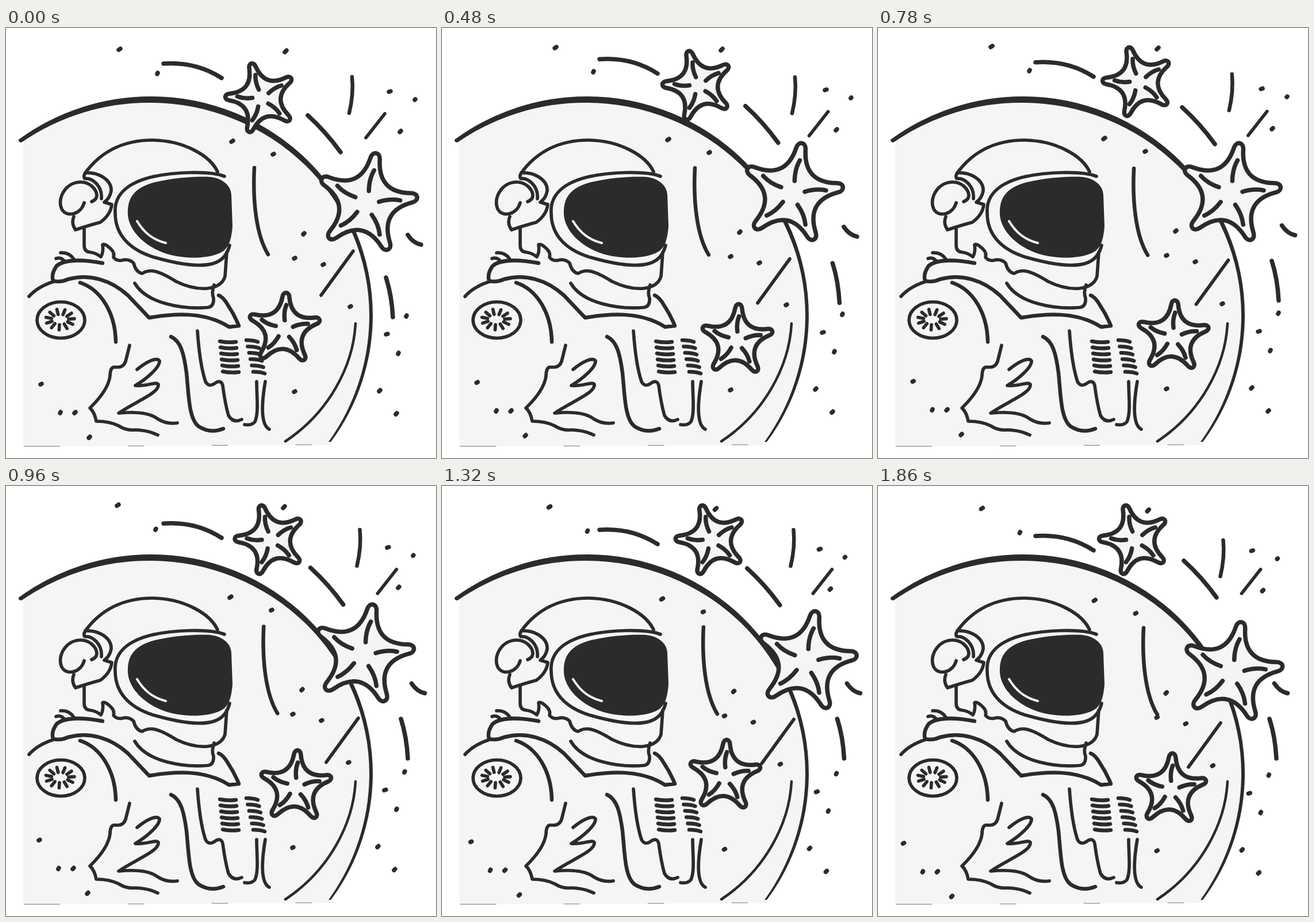
Animation of 748 by 748 pixels, one loop 1.92 s. Source, as an HTML page:

```html
<!DOCTYPE html>
<html lang="en">
<head>
<meta charset="utf-8">
<title>Astronaut and stars</title>
<style>
  html, body { margin: 0; width: 100%; height: 100%; overflow: hidden; background: #fff; }
  svg { display: block; width: 100vw; height: 100vh; }
  .ink { fill: none; stroke: #2b2b2b; stroke-width: 5.7; stroke-linecap: round; stroke-linejoin: round; }
  .solid { fill: #2b2b2b; stroke: none; }
  .pale { fill: #f5f5f4; }
  .bold { stroke-width: 6.5; }
  .heavy { stroke-width: 7.5; }
</style>
</head>
<body>
<svg viewBox="0 0 748 748">
  <!-- moon -->
  <path class="pale" d="M30 728V194A390 390 0 0 1 252 122A383 378 0 0 1 635 500A372 372 0 0 1 563 720L566 725Z"/>
  <path class="solid" d="M22 194A390 390 0 0 1 252 119A386 381 0 0 1 638 500A368 368 0 0 1 565 720L561 720A376 376 0 0 0 632 500A382 370 0 0 0 250 130A390 390 0 0 0 27 199Q21 199 22 194Z"/>
  <path class="ink" style="stroke-width:1;stroke:#777" d="M32 727.5H94M212 727H240M358 726H386M504 725H532"/>
  <path class="ink" style="stroke-width:4.5" d="M608 514C604 590 560 670 486 719"/>

  <!-- helmet -->
  <g class="ink">
    <path d="M138 252C165 215 205 195 255 195C310 196 355 222 368 250"/>
    <path d="M380 258C355 248 290 250 250 260C205 272 188 295 190 322C190 360 215 385 255 398C300 411 340 418 365 408C380 402 386 390 389 378"/>
    <path class="solid" d="M212 325C210 290 230 276 260 268C295 260 330 258 355 259C378 262 391 274 392 290L394 345C392 368 388 384 373 391C350 402 310 402 280 393C240 380 214 352 212 325Z"/>
    <path style="stroke:#f5f5f4;stroke-width:4" d="M228 336C240 356 255 368 278 374"/>
    <path d="M136 304C130 325 105 330 97 315C88 295 105 268 130 268C145 268 158 280 158 292Q157 299 149 302"/>
    <path d="M138 252Q134 258 137 262C150 260 168 275 166 297"/>
    <path d="M138 252C160 250 184 264 183 283Q181 296 171 303L184 307Q182 325 164 338Q145 343 121 351Q113 340 118 328"/>
    <path d="M136 347V378Q136 389 146 390Q156 391 165 398Q170 390 168 377Q172 374 183 385Q189 391 187 399Q193 406 202 404Q214 401 222 409Q226 425 237 427Q246 421 258 423Q272 426 296 441Q325 455 350 453Q376 450 381 432L384 390"/>
    <path d="M362 447Q357 460 361 470Q362 484 352 486C310 490 245 480 224 444"/>
  </g>

  <!-- suit -->
  <g class="ink">
    <path class="bold" d="M168 409C130 402 100 403 88 414Q78 428 82 440Q95 443 108 437C145 427 182 438 212 465Q232 486 249 504C290 497 345 492 388 520L405 518Q398 500 386 482Q378 468 370 465"/>
    <path d="M40 467Q55 450 83 441M87 401Q96 398 102 406M95 391Q110 390 118 402"/>
    <path class="bold" d="M129 443C165 455 190 495 191 546"/>
    <ellipse cx="95.5" cy="508" rx="41.5" ry="31.5"/>
    <path id="patch"/>
    <path d="M215 552L208 580Q205 589 196 590L187 590Q181 592 181 605Q178 630 146 661Q154 668 157 684Q180 684 196 692Q210 701 225 699Q248 700 264 708"/>
    <path d="M228 594C245 580 262 572 267 579C268 590 245 610 225 622C245 624 262 614 265 620C267 635 225 650 196 670C225 667 250 669 264 680Q280 690 298 687"/>
    <path class="bold" d="M287 537C305 545 310 570 314 600C318 640 318 680 335 693Q355 706 378 697"/>
    <path d="M333 527C336 570 342 600 347 615Q352 625 362 619Q374 610 377 622C380 645 383 660 387 674Q395 688 410 681"/>
    <path d="M436 615C436 640 440 670 433 685Q427 692 415 690M451 615C445 650 442 690 458 698"/>
    <path id="hoses" class="bold"/>
  </g>

  <path class="ink heavy" data-pace="dust" data-via="0,-5 -16.7,2"
    d="M196 38l3-2M485 42l3-3M263 80l1-2M666 111l3-1M711 125l1-1M685 181l2-2M392 198l3-2M464 220l2-1M517 359l2-2M501 401l2-1M551 412l2-1M598 485l2-1M696 502l1-2M661 533l3-1M682 567l1-2M649 632l2-2M678 672l2-2M501 633l2-1M60 620l2-1M94 670l1-2M119 670l2-2M144 713l2-2"/>

  <!-- shooting lines -->
  <g class="ink" id="lines">
    <path data-via="0,-9 0,10.6 0,25" class="heavy" d="M274 62Q330 58 375 87"/>
    <path data-via="14,.5 13.2,-14.7 -1.5,9.2" class="bold" d="M602 85Q605 115 597 148"/>
    <path data-via="14.7,-4 23.7,-4 6.5,-4" d="M659 149L626 191"/>
    <path data-via="3.3,-19 5.5,-4.3 7,-22" class="heavy" d="M525 152Q556 180 582 216"/>
    <path data-via="9.3,.7 20.5,2 30,3.8" class="bold" d="M432 243C429 300 435 360 456 394"/>
    <path data-via="1.2,15.7 13.5,15.7 -8,24" d="M604 388L548 465"/>
    <path data-via="21.5,-29 28.7,-29 20,-29" class="heavy" d="M661 434Q671 465 673 503"/>
    <path data-via="0,-16.5 10.5,-16.5 -9.5,-16.5" class="heavy" d="M699 360Q708 374 722 377"/>
  </g>

  <g class="ink heavy" id="stars"></g>
</svg>
<script>
  const LOOP = 1920, STEP = 60;
  const PACE = { star: [0, 620, 1240, 1860], line: [0, 560, 1200, 1680], dust: [0, 810, 1620] };
  const $ = id => document.getElementById(id);
  const range = n => [...Array(n).keys()];

  // point at an angle in degrees on an ellipse
  const polar = (deg, rx, ry = rx) => {
    const a = deg * Math.PI / 180;
    return `${(rx * Math.cos(a)).toFixed(1)} ${(ry * Math.sin(a)).toFixed(1)}`;
  };

  // five blunt arms joined by smooth valleys, one crease along each arm
  function star(x, y, r, turn, via) {
    const arms = range(5).map(k => turn + 72 * k);
    const edge = arms.map((a, k) =>
      `${k ? '' : 'M' + polar(a - 6, r * 0.9)}` +
      `C${polar(a - 4.1, r * 1.05)} ${polar(a + 4.1, r * 1.05)} ${polar(a + 6, r * 0.9)}` +
      `Q${polar(a + 36, r * 0.31)} ${polar(a + 66, r * 0.9)}`).join('') + 'Z';
    const creases = arms.map(a =>
      `M${polar(a, r * 0.25)}Q${polar(a - 5, r * 0.48)} ${polar(a + 2, r * 0.67)}`).join('');
    return `<g data-pace="star" data-via="${via}"><g transform="translate(${x} ${y})">` +
      `<path class="pale" d="${edge}"/><path d="${creases}"/></g></g>`;
  }

  $('stars').innerHTML =
    star(444, 122, 62, -106, '2.5,-28 28,-28 3,-28') +
    star(627, 305, 88, -79, '-23,-22.5 8.7,-2.7 -11.5,19') +
    star(484, 524, 63, -87, '37.5,25.5 5.5,-22.5 25,4.5');

  $('patch').setAttribute('d', range(11).map(i => {
    const a = i * 360 / 11 - 70;
    return `M${polar(a, 15, 9)}L${polar(a, 25, 18)}`;
  }).join(''));
  $('patch').setAttribute('transform', 'translate(94 507)');

  $('hoses').setAttribute('d', range(6).map(i =>
    `M${372 + i} ${545 + i * 10.5}q15 3 28 1M${418 + i * 2.4} ${543 + i * 11}q12 0 20 3`).join(''));

  for (const line of $('lines').children) line.dataset.pace = 'line';

  const parts = [...document.querySelectorAll('[data-via]')].map(el => ({
    el,
    times: PACE[el.dataset.pace],
    spots: [[0, 0], ...el.dataset.via.split(' ').map(p => p.split(',').map(Number))]
  }));

  function offset(times, spots, t) {
    const i = times.findIndex(k => k > t);
    if (i < 0) return spots[spots.length - 1];
    const p = (t - times[i - 1]) / (times[i] - times[i - 1]);
    return spots[i].map((v, n) => spots[i - 1][n] + (v - spots[i - 1][n]) * p);
  }

  function draw(now) {
    const t = Math.floor((now % LOOP) / STEP) * STEP;
    for (const { el, times, spots } of parts)
      el.setAttribute('transform', `translate(${offset(times, spots, t).join(' ')})`);
  }

  let start;
  function tick(now) {
    start ??= now;
    draw(now - start);
    requestAnimationFrame(tick);
  }
  draw(0);
  requestAnimationFrame(tick);
</script>
</body>
</html>
```
